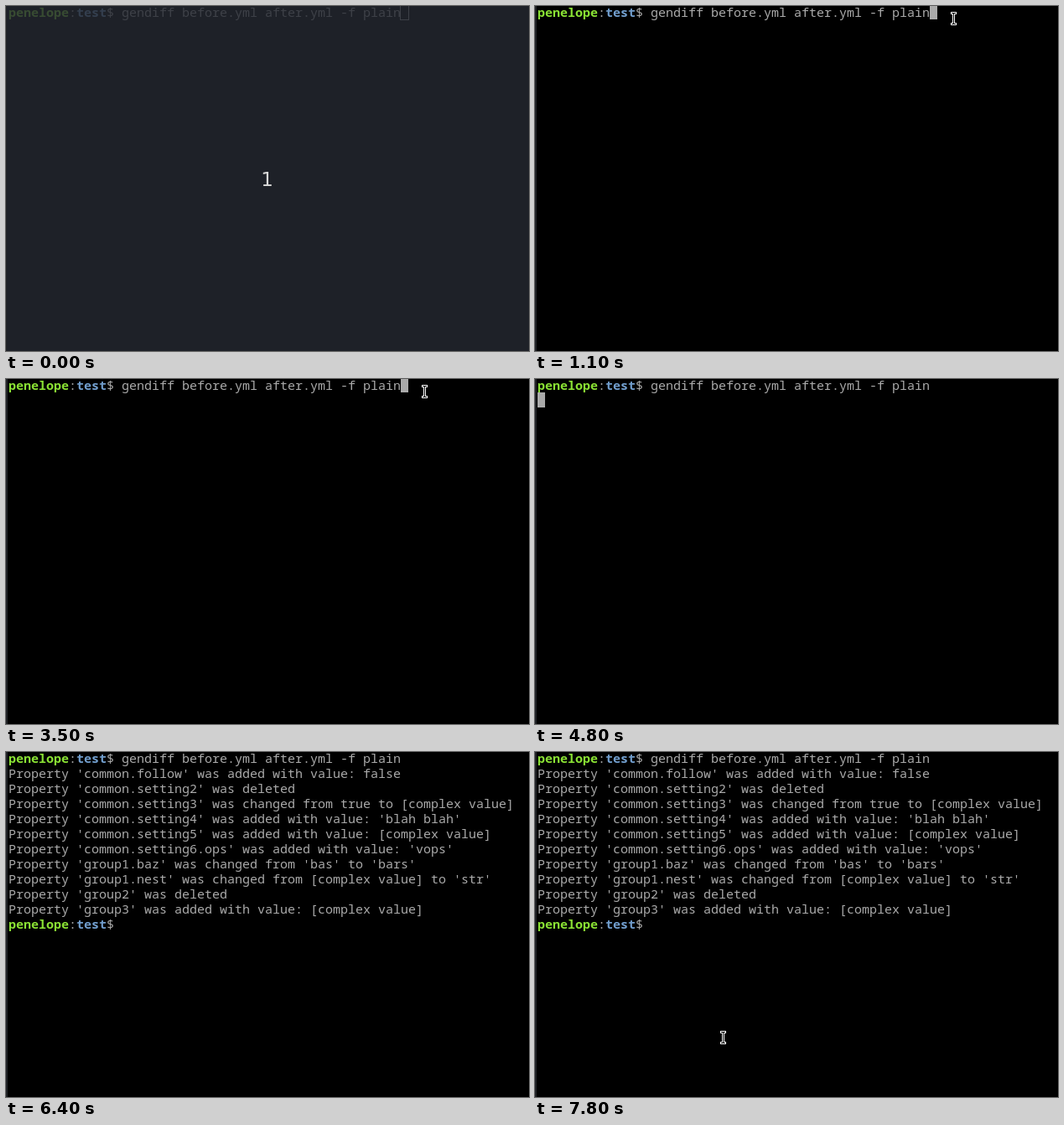
Animation of 624x412 px, one loop 8000 ms. Source, as an HTML page with a canvas:

```html
<!DOCTYPE html>
<html>
<head>
<meta charset="utf-8">
<style>
  html, body { margin: 0; width: 100%; height: 100%; overflow: hidden; background: #000; }
  canvas { display: block; }
</style>
</head>
<body>
<canvas width="624" height="412"></canvas>
<script>
const ctx = document.querySelector('canvas').getContext('2d');
const LOOP = 8000, CELL_W = 9, CELL_H = 18;
const GREY = '#aaaaaa', GREEN = '#8ae234', BLUE = '#729fcf';
const MONO = '15px "Noto Sans Mono", monospace';
const OUTPUT = `Property 'common.follow' was added with value: false
Property 'common.setting2' was deleted
Property 'common.setting3' was changed from true to [complex value]
Property 'common.setting4' was added with value: 'blah blah'
Property 'common.setting5' was added with value: [complex value]
Property 'common.setting6.ops' was added with value: 'vops'
Property 'group1.baz' was changed from 'bas' to 'bars'
Property 'group1.nest' was changed from [complex value] to 'str'
Property 'group2' was deleted
Property 'group3' was added with value: [complex value]`.split('\n');

const cellX = col => 3 + col * CELL_W;
const cellY = row => row * CELL_H - 2;

function rect(color, x, y, w, h) {
  ctx.fillStyle = color;
  ctx.fillRect(x, y, w, h);
}

function text(str, col, row, color = GREY, bold = false) {
  ctx.font = (bold ? 'bold ' : '') + MONO;
  ctx.fillStyle = color;
  ctx.fillText(str, cellX(col), cellY(row) + 15);
}

function prompt(row, command = '') {
  text('penelope', 0, row, GREEN, true);
  text(':', 8, row);
  text('test', 9, row, BLUE, true);
  text('$ ' + command, 13, row);
}

function block(col, row) {
  rect(GREY, cellX(col), cellY(row), CELL_W, CELL_H);
}

function hollowBlock(col, row) {
  ctx.strokeStyle = GREY;
  ctx.strokeRect(cellX(col) - 0.5, cellY(row) + 0.5, CELL_W + 1, CELL_H);
}

// I-beam: black core with a white edge
function pointer(x, y) {
  x = Math.round(x) - 4;
  y = Math.round(y) - 8;
  rect('#fff', x, y, 7, 3);
  rect('#fff', x, y + 13, 7, 3);
  rect('#fff', x + 2, y, 3, 16);
  rect('#000', x + 1, y + 1, 5, 1);
  rect('#000', x + 1, y + 14, 5, 1);
  rect('#000', x + 3, y + 1, 1, 14);
}

function pointerAt(t) {
  if (t < 700 || (t >= 4600 && t < 6800)) return null;
  if (t < 1000) return [495, 12];
  if (t < 7000) return [500, 15];
  if (t < 7500) {
    const k = (t - 6900) / 500;
    return [500 - 84 * k, 15 + 190 * k];
  }
  const k = Math.min(1, Math.max(0, (t - 7500) / 300));
  return [416 - 191 * k, 205 + 136 * k];
}

const blinkOn = elapsed => Math.floor(elapsed / 600) % 2 === 0;

function draw(time) {
  const t = Math.floor(time % LOOP / 100) * 100;
  const focused = t >= 1100;
  rect('#000', 0, 0, 624, 412);

  ctx.globalAlpha = focused ? 1 : 0.8;
  prompt(0, 'gendiff before.yml after.yml -f plain');
  if (!focused) hollowBlock(52, 0);
  else if (t < 4800) {
    if (t >= 4600 || blinkOn(t - 1100)) block(52, 0);
  } else if (t < 5000) block(0, 1);
  else {
    OUTPUT.forEach((line, i) => text(line, 0, i + 1));
    prompt(11);
    if (blinkOn(t - 4600)) block(15, 11);
  }
  ctx.globalAlpha = 1;

  if (t < 100) {
    rect('rgba(40, 44, 53, 0.77)', 0, 0, 624, 412);
    ctx.font = '23px "DejaVu Sans", sans-serif';
    ctx.fillStyle = '#d8d8d8';
    ctx.textAlign = 'center';
    ctx.fillText('1', 311.5, 215);
    ctx.textAlign = 'left';
  }
  rect('#202226', 0, 0, t < 100 ? 1 : 2, 412);

  const p = pointerAt(t);
  if (p) pointer(...p);
}

function tick() {
  draw(performance.now());
  requestAnimationFrame(tick);
}
tick();
</script>
</body>
</html>
```
